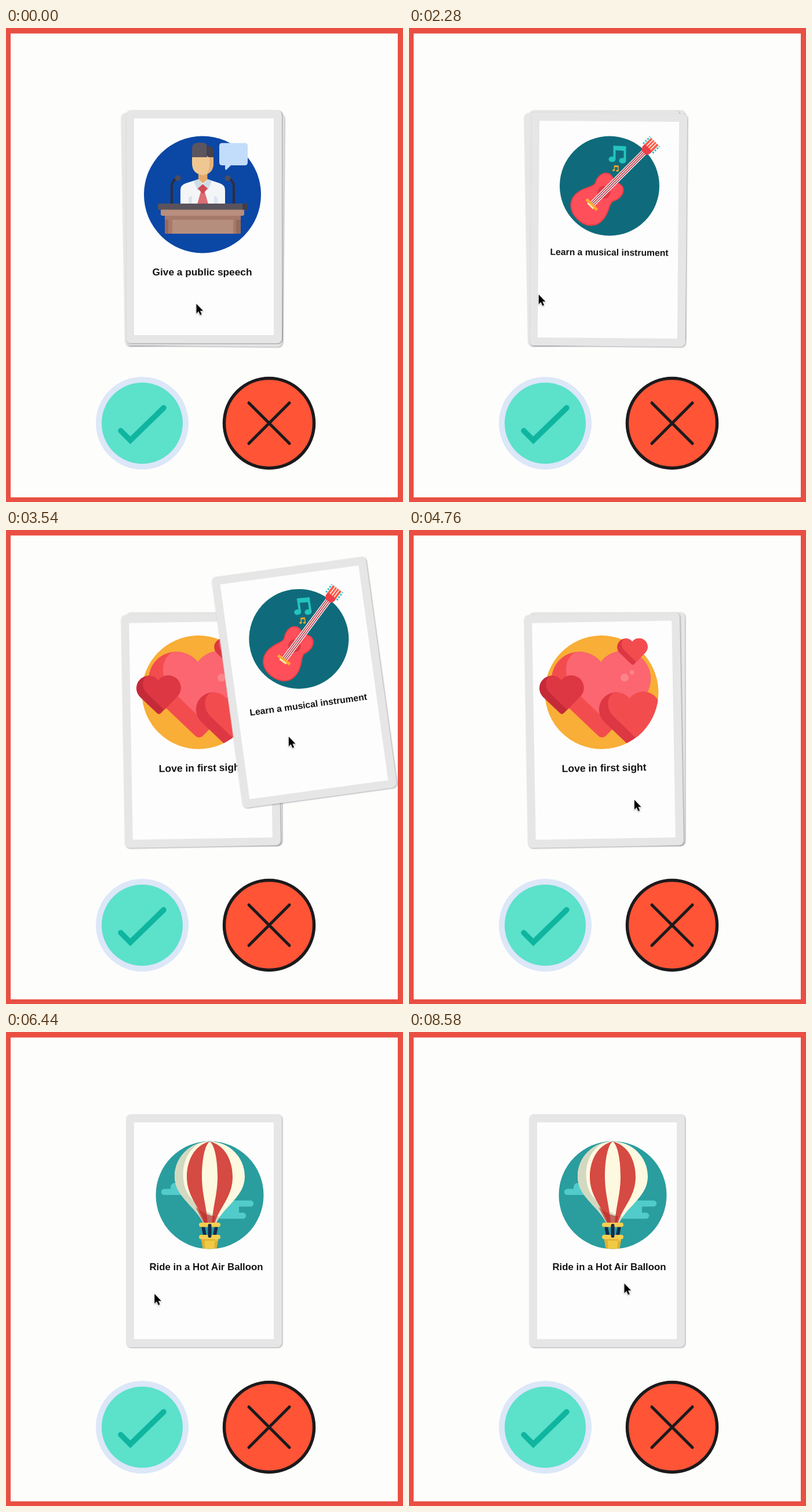
These frames come from a looping animation (685x818 px, 8680 ms). An HTML page:

```html
<!DOCTYPE html>
<html lang="en">
<head>
<meta charset="utf-8">
<title>Card swipe</title>
<style>
  html, body { margin: 0; width: 100%; height: 100%; overflow: hidden; background: #fdfdfc; }
  svg { display: block; }
  text { font: bold 17px "Liberation Sans", Arial, sans-serif; text-anchor: middle; fill: #141414; }
  .edge { fill: #e6e6e6; filter: drop-shadow(1px 1px 1px rgba(20, 20, 40, .38)); }
  .face { fill: #fdfdfd; }
  .line { fill: none; stroke-linecap: round; }
</style>
</head>
<body>
<svg width="685" height="818" viewBox="0 0 685 818">
  <defs>
    <g id="blank">
      <rect class="edge" x="-134.5" y="-201" width="268.5" height="402" rx="8"/>
      <rect class="face" x="-121" y="-187" width="241" height="374"/>
    </g>
    <g id="heart">
      <path fill="var(--dark)" d="M0 .107A.28 .28 0 1 1 .418 .478L.035 .855Q0 .882-.035 .855L-.418 .478A.28 .28 0 1 1 0 .107Z"/>
      <path fill="var(--light)" d="M0 .107A.28 .28 0 1 1 .418 .478L.12 .776L-.27 .386C-.42 .22-.34 0-.22 0A.28 .28 0 0 1 0 .107Z"/>
    </g>
    <g id="note">
      <path d="M9 0L31 1V26H27V9L13 8V23H9Z"/>
      <ellipse cx="7" cy="23.5" rx="6" ry="4.8"/>
      <ellipse cx="25" cy="26" rx="6" ry="4.8"/>
    </g>
    <path id="envelope" d="M351.5 189C318 189 291 216 291 249C291 285 327 300 341 331H362C376 300 412 285 412 249C412 216 385 189 351.5 189Z"/>
    <clipPath id="inEnvelope"><use href="#envelope"/></clipPath>
    <clipPath id="inSunset"><circle cx="281" cy="269.5" r="98"/></clipPath>
    <clipPath id="inSky"><circle cx="351.5" cy="281.5" r="93"/></clipPath>
  </defs>

  <!-- page frame -->
  <path fill="#e94f43" fill-rule="evenodd" d="M0 0H685V818H0ZM8 9.5V810H676V9.5Z"/>

  <!-- buttons -->
  <circle cx="235" cy="682" r="80" fill="#dce7f8"/>
  <circle cx="235" cy="682" r="70" fill="#5ce1cb"/>
  <path class="line" stroke="#0fb59f" stroke-width="9.5" d="M198 695L214.500 711.500L272 655.500"/>
  <circle cx="454" cy="682" r="77.500" fill="#ff5436" stroke="#1c1a1c" stroke-width="5.500"/>
  <path class="line" stroke="#1c1a1c" stroke-width="5" d="M419 647L489 717M489 647L419 717"/>

  <rect x="208" y="142.500" width="267" height="401" rx="13" fill="#e94f43"/>

  <g id="balloon">
    <use href="#blank"/>
    <g transform="translate(-342 -343)">
      <circle cx="351.5" cy="281.5" r="93" fill="#2a9d9f"/>
      <g clip-path="url(#inSky)">
        <path fill="#52cbcb" d="M284 266H310V281H284ZM365 296H402V318H365Z"/>
        <path class="line" stroke="#52cbcb" stroke-width="10.500" d="M273 276H300M290 266H305M375 296H422M370 317H409"/>
        <path class="line" stroke="#2a9d9f" stroke-width="9" d="M407 306.500H414"/>
        <use href="#envelope" fill="#fdf8e0"/>
        <g clip-path="url(#inEnvelope)">
          <path fill="#d2d9c0" d="M340 189C300 205 298 262 318 285C335 305 355 318 372 319V335H280V189Z"/>
          <g fill="#d54a42">
            <path d="M351.500 189C325 195 312 222 312 250C312 285 335 302 343 331H348C346 300 338 280 338 250C338 220 343 195 351.500 189Z"/>
            <path d="M351.500 189C378 195 391 222 391 250C391 285 368 302 360 331H355C357 300 365 280 365 250C365 220 360 195 351.500 189Z"/>
          </g>
          <path fill="#b92c29" opacity=".65" d="M327 302Q345 317 361 318L358 331H342Z"/>
        </g>
        <path fill="#172b49" d="M337 335H343L346 351H340ZM366 335H360L357 351H363Z"/>
        <path fill="#f0ca45" d="M336.500 356H366.500L363 375H340Z"/>
        <path fill="#dfb032" d="M336.500 356H342L344 375H340ZM366.500 356H361L359 375H363ZM338 356H365V360H338Z"/>
        <g fill="#f4cf50">
          <rect x="333" y="329" width="37" height="7.500" rx="3.700"/>
          <rect x="333" y="350" width="37" height="7.500" rx="3.700"/>
        </g>
        <rect x="348.500" y="331" width="6" height="24" rx="3" fill="#172b49"/>
      </g>
      <text x="345.500" y="410.500" style="font-size:16.8px">Ride in a Hot Air Balloon</text>
    </g>
  </g>

  <g id="love">
    <use href="#blank"/>
    <g transform="translate(-284 -335)">
      <circle cx="281" cy="269.500" r="98" fill="#f8ae37"/>
      <use href="#heart" transform="translate(280.500 199) scale(171)" style="--dark:#f34c4f;--light:#fb6670"/>
      <circle cx="321" cy="245" r="7" fill="#fc838b"/>
      <circle cx="334" cy="236" r="4" fill="#fc838b"/>
      <g clip-path="url(#inSunset)">
        <use href="#heart" transform="translate(329 270) scale(106)" style="--dark:#dc3742;--light:#f34c4f"/>
      </g>
      <use href="#heart" transform="translate(212 239.500) scale(76.500)" style="--dark:#c52a38;--light:#dc3742"/>
      <use href="#heart" transform="translate(335.500 177.500) scale(52.500)" style="--dark:#dc3742;--light:#f34c4f"/>
      <text x="283" y="406" style="font-size:17.500px">Love in first sight</text>
    </g>
  </g>

  <g id="guitar">
    <use href="#blank"/>
    <g transform="rotate(-.5) translate(-344.500 -348)">
      <circle cx="346" cy="272.500" r="86" fill="#0f6b7b"/>
      <use href="#note" transform="translate(343.500 203)" fill="#23c4bc"/>
      <use href="#note" transform="translate(350.500 237) scale(.36)" fill="#f6a82c"/>
      <g transform="translate(316 304) rotate(45)">
        <path fill="#ff4f5a" stroke="#ea4049" stroke-width="2" d="M0-56C8-56 12-61 18-57C28-51 26-37 22-30C18-22 31-12 32 6C33 26 18 36 0 36C-18 36-33 26-32 6C-31-12-18-22-22-30C-26-37-28-51-18-57C-12-61-8-56 0-56Z"/>
        <circle cy="-29" r="11" fill="#dd3a45"/>
        <rect x="-5" y="-130" width="10" height="130" fill="#b8404e"/>
        <path stroke="#fff" stroke-width="1.300" d="M-4.500 3V-130M-1.500 3V-130M1.500 3V-130M4.500 3V-130"/>
        <path class="line" stroke="#fba92f" stroke-width="5" style="stroke-linecap:butt" d="M-13 1H13"/>
        <path stroke="#ffe9a8" stroke-width="3" d="M-7 4H7"/>
        <path fill="#ee3e48" d="M-6-126H6L9-132V-138H-9V-132Z"/>
        <rect x="-9" y="-153" width="18" height="16" fill="#ff5a45"/>
        <path stroke="#fff" stroke-width="1.500" d="M-4.500-138V-153M0-138V-153M4.500-138V-153"/>
        <path stroke="#2bc5cb" stroke-width="3" stroke-dasharray="3 2.200" d="M-11.500-136V-153M11.500-136V-153"/>
      </g>
      <text x="345.500" y="392.500" transform="rotate(.5 345.500 392.500)" style="font-size:15.700px">Learn a musical instrument</text>
    </g>
  </g>

  <g id="speech">
    <use href="#blank"/>
    <g transform="translate(-342 -343)">
      <circle cx="339" cy="287.500" r="101" fill="#0b47a5"/>
      <path fill="#c2ddfb" d="M373 198.500H412Q417 198.500 417 203.500V232Q417 237 412 237H388L380 245Q378 245 378 242V237H373Q368 237 368 232V203.500Q368 198.500 373 198.500Z"/>
      <rect x="332" y="244" width="15.500" height="28" fill="#e5a869"/>
      <path fill="#efc791" d="M321 215H358V235Q357 252 339.500 254Q322 252 321 235Z"/>
      <path fill="#e8b27a" d="M351 215H358V235Q357 247 347 252Q351 244 351 235Z"/>
      <path fill="#5b5560" d="M321 223V208Q321 198 331 198H341Q347 199 347 206V223Z"/>
      <path fill="#45414d" d="M346 203Q358 203 358 213V223H350Q346 221 346 217Z"/>
      <path fill="#f3f5f7" d="M301 304V280Q301 271 310 268L332 261L339.500 268L348 261L369 268Q378 271 378 280V304Z"/>
      <path fill="#dbe4ee" d="M315 304V294Q316 291 321 290V304ZM365 304V294Q364 291 359 290V304Z"/>
      <path fill="#cfdce8" d="M332 261L324 264L331 281L339.500 270ZM348 261L355 264L348 281L339.500 270Z"/>
      <path fill="#dc6c75" d="M336 283H343L349 304H330Z"/>
      <path fill="#ce4a55" d="M339.500 269.500L348 277L339.500 286.500L331 277Z"/>
      <path class="line" stroke="#2e2d3d" stroke-width="4" d="M286 303V273Q286 263 295 260M393 303V273Q393 263 384 260"/>
      <circle cx="296.500" cy="259" r="4.800" fill="#504c58"/>
      <circle cx="382.500" cy="259" r="4.800" fill="#504c58"/>
      <rect x="274" y="322" width="131" height="33" rx="2" fill="#b68e7e"/>
      <path fill="#97695a" d="M274 323H287V355H276Q274 355 274 353ZM392 323H405V353Q405 355 403 355H392Z"/>
      <path fill="#a67a6a" d="M280 323H287V355H280ZM392 323H397V355H392ZM274 323H405V331H274Z"/>
      <rect x="267" y="312" width="144" height="12" rx="3" fill="#b98e7f"/>
      <rect x="262" y="303" width="155" height="10.500" rx="2" fill="#5a525c"/>
      <path fill="#443e49" d="M408 303H415Q417 303 417 305V311.500Q417 313.500 415 313.500H408Z"/>
      <text x="338.500" y="426.500" style="font-size:17.300px">Give a public speech</text>
    </g>
  </g>

  <path id="cursor" fill="#000" stroke="#fff" stroke-width="1.300" paint-order="stroke" style="filter:drop-shadow(0 1px 1px rgba(0,0,0,.35))"
    d="M.5 0V16.500L4.300 13L7 19.300L9.700 18.200L7 12H12Z"/>
</svg>
<script>
const LOOP = 8680, FLIGHT = 300, SPIN = 0.00054;

// time, x, y of the pointer
const path = [
  [0, 328, 476], [350, 288, 475], [700, 241, 472], [1120, 115, 459], [1400, 34, 451],
  [1650, 26, 452], [1860, 40, 456], [2280, 223, 460], [2650, 312, 443], [2800, 317, 442],
  [3200, 385, 412], [3540, 487, 357], [3620, 524, 330], [3900, 550, 335], [4300, 470, 420],
  [4800, 384, 468], [5200, 376, 470], [5480, 336, 461], [5600, 324, 460], [5850, 205, 442],
  [6100, 175, 442], [6600, 300, 455], [6850, 320, 451], [7150, 282, 446], [7320, 292, 446],
  [7600, 351, 442], [7800, 370, 434], [7950, 371, 434], [LOOP, 371, 434]
];

// home pose, drag times, and the offset the card ends at
const cards = [
  { id: "speech", x: 342, y: 343, tilt: 0, grab: 700, drop: 1400, end: [-640, -60] },
  { id: "guitar", x: 344.5, y: 348, tilt: 0.5, grab: 2800, drop: 3620, end: [660, -320] },
  { id: "love", x: 336.5, y: 345.5, tilt: -1, grab: 5200, drop: 5850, end: [-640, -220] },
  { id: "balloon", x: 342, y: 343, tilt: 0, grab: 6850, drop: 7950, end: [0, 0], stays: true }
];

const node = id => document.getElementById(id);
const mix = (a, b, k) => a + (b - a) * k;
const ease = k => k * k * (3 - 2 * k);

function slope(i, axis) {
  const a = path[Math.max(i - 1, 0)], b = path[Math.min(i + 1, path.length - 1)];
  const p = path[i];
  if ((p[axis] - a[axis]) * (b[axis] - p[axis]) <= 0) return 0;
  return (b[axis] - a[axis]) / (b[0] - a[0]);
}

function pointer(t) {
  let i = path.findIndex(p => p[0] > t) - 1;
  if (i < 0) i = path.length - 2;
  const a = path[i], b = path[i + 1], span = b[0] - a[0], k = (t - a[0]) / span;
  return [1, 2].map(axis =>
    mix(a[axis], b[axis], ease(k)) +
    span * k * (1 - k) * ((1 - k) * slope(i, axis) - k * slope(i + 1, axis)));
}

function pose(card, t) {
  if (t < card.grab) return [0, 0, card.tilt];
  const from = pointer(card.grab), to = pointer(Math.min(t, card.drop));
  const dx = to[0] - from[0], dy = to[1] - from[1], turn = dx * dy * SPIN;
  if (t <= card.drop) return [dx, dy, turn];
  const k = ease(Math.min((t - card.drop) / FLIGHT, 1));
  return [mix(dx, card.end[0], k), mix(dy, card.end[1], k), card.stays ? turn * (1 - k) : turn];
}

function draw() {
  const t = performance.now() % LOOP;
  for (const card of cards) {
    const [dx, dy, turn] = pose(card, t);
    node(card.id).setAttribute("transform", `translate(${card.x + dx} ${card.y + dy}) rotate(${turn})`);
  }
  node("cursor").setAttribute("transform", `translate(${pointer(t).join(" ")})`);
  requestAnimationFrame(draw);
}
draw();
</script>
</body>
</html>
```
